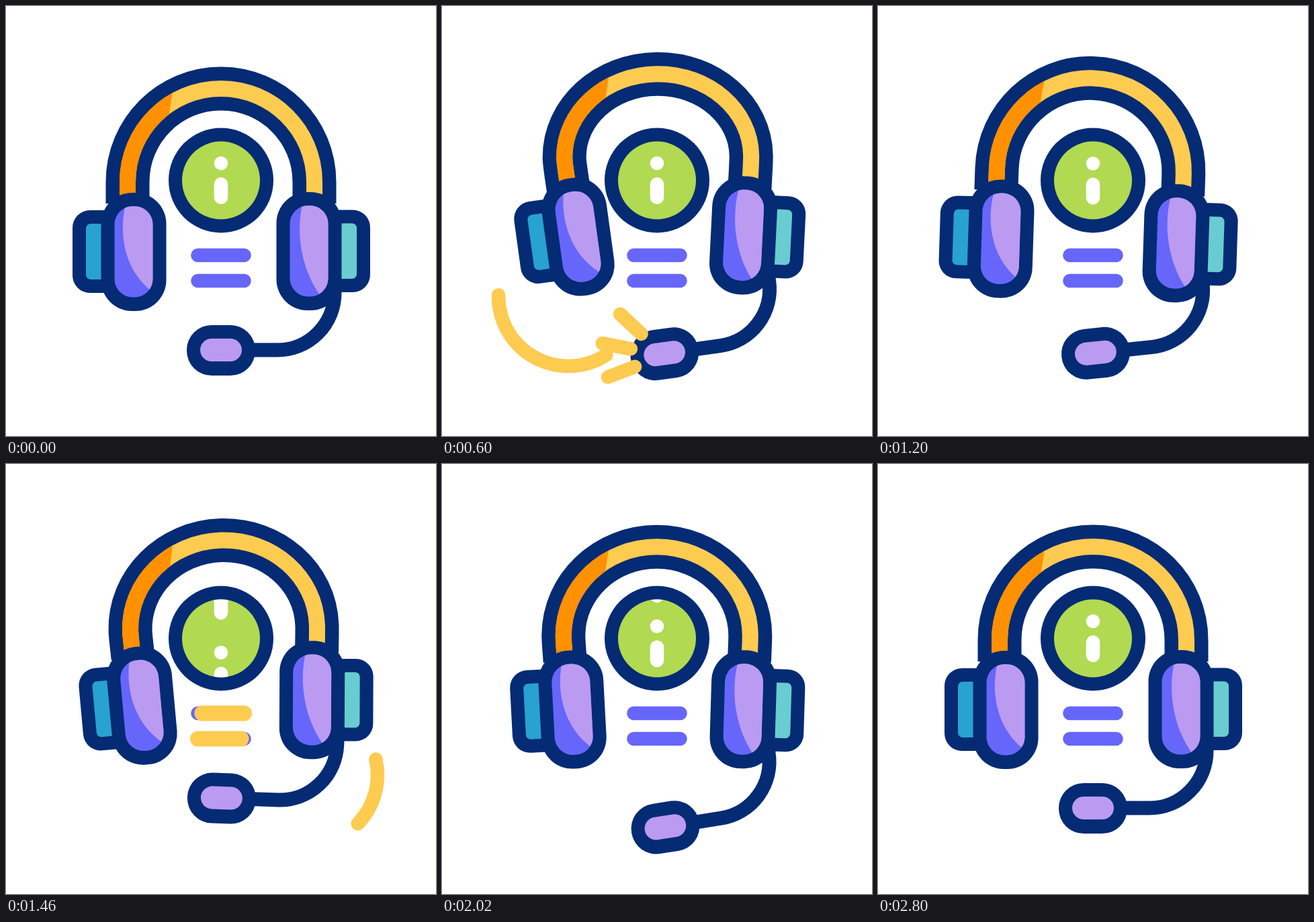
An HTML page with a canvas that plays this animation: 640 px wide and 640 px high, repeating every 3.2 s.

```html
<!DOCTYPE html>
<html lang="en">
<head>
<meta charset="utf-8">
<title>Support headset</title>
<style>
html, body { margin: 0; width: 100%; height: 100%; overflow: hidden; background: #fff; }
canvas { display: block; width: 640px; height: 640px; }
</style>
</head>
<body>
<canvas id="stage" width="640" height="640"></canvas>
<script>
const ctx = document.getElementById('stage').getContext('2d');
const LOOP = 3200;
const RAD = Math.PI / 180;
const NAVY = '#042b74', YELLOW = '#fecb51', ORANGE = '#ff9100', GREEN = '#b1d951';
const PURPLE = '#6766fa', LILAC = '#bb9af1', BLUE = '#28a2d0', TEAL = '#69ccd1';

// Pose tracks as [time, value]
const LIFT = [[260, 0], [440, 11], [610, -22], [960, 11], [1300, -22], [1680, 11], [2060, 0]];
const ROLL = [[260, 0], [380, -1.75], [780, 2.2], [1180, -1.75], [1460, 1.75], [1800, -1.75], [2060, 0]];
const LEFT_EAR = [[260, 0], [600, 7.3], [960, 5.3], [1140, -0.5], [1460, 3.5], [1800, 9.6], [2160, 0]];
const RIGHT_EAR = [[260, 0], [600, 3.4], [960, 3], [1140, 0], [1460, 2], [1800, 5], [2160, 0]];
const MIC_SWING = [[260, 0], [500, 10], [780, 3], [1020, 10.2], [1470, -2], [2200, 10.8], [2800, 0]];

const clamp = v => Math.min(1, Math.max(0, v));
const ease = v => (1 - Math.cos(Math.PI * clamp(v))) / 2;
const span = (t, from, to) => ease((t - from) / (to - from));
const mix = (a, b, k) => a + (b - a) * k;

function track(keys, t) {
  if (t <= keys[0][0]) return keys[0][1];
  for (let i = 1; i < keys.length; i++) {
    const [t0, v0] = keys[i - 1], [t1, v1] = keys[i];
    if (t <= t1) return mix(v0, v1, span(t, t0, t1));
  }
  return keys[keys.length - 1][1];
}

function box(x0, y0, x1, y1, r, color) {
  ctx.beginPath();
  ctx.roundRect(x0, y0, x1 - x0, y1 - y0, r);
  ctx.fillStyle = color;
  ctx.fill();
}

function disc(x, y, r, color) {
  ctx.beginPath();
  ctx.arc(x, y, r, 0, 2 * Math.PI);
  ctx.fillStyle = color;
  ctx.fill();
}

function stroke(color, width, cap = 'round') {
  ctx.strokeStyle = color;
  ctx.lineWidth = width;
  ctx.lineCap = cap;
  ctx.stroke();
}

function line(x0, y0, x1, y1, color, width) {
  ctx.beginPath();
  ctx.moveTo(x0, y0);
  ctx.lineTo(x1, y1);
  stroke(color, width);
}

function turn(x, y, angle) {
  ctx.translate(x, y);
  ctx.rotate(angle);
  ctx.translate(-x, -y);
}

function group(draw) {
  ctx.save();
  draw();
  ctx.restore();
}

function drawMic(swing) {
  turn(489, 437, -swing * RAD);
  ctx.beginPath();
  ctx.moveTo(489, 400);
  ctx.lineTo(489, 427);
  ctx.arc(404, 427, 85, 0, Math.PI / 2);
  ctx.lineTo(350, 512);
  stroke(NAVY, 21, 'butt');
  box(269, 475, 371, 550, 37, NAVY);
  box(289, 495, 351, 529, 17, LILAC);
}

// Half of the headband; side is -1 for left, 1 for right
function bandHalf(side, bend, kneeY) {
  const kneeX = 320 + side * 139;
  const endX = kneeX - side * 45 * Math.sin(bend);
  ctx.moveTo(320, 123);
  ctx.bezierCurveTo(320 + side * 76.8, 123, kneeX, mix(kneeY, 123, 0.5523), kneeX, kneeY);
  ctx.bezierCurveTo(kneeX, kneeY + 10,
    endX + side * 14 * Math.sin(bend), 294 - 14 * Math.cos(bend), endX, 294);
}

function drawBand(left, right) {
  const kneeY = 262 - 85 * Math.max(0, left + right);
  ctx.beginPath();
  bandHalf(-1, left, kneeY);
  bandHalf(1, right, kneeY);
  stroke(NAVY, 65, 'butt');
  stroke(YELLOW, 24, 'butt');
  group(() => {
    ctx.beginPath();
    ctx.moveTo(0, 0);
    ctx.lineTo(267, 0);
    ctx.lineTo(219, 320);
    ctx.lineTo(0, 320);
    ctx.clip();
    ctx.beginPath();
    bandHalf(-1, left, kneeY);
    stroke(ORANGE, 24, 'butt');
  });
}

function drawCup(x0, y0, shine) {
  box(x0, y0, x0 + 97, y0 + 176, 46, NAVY);
  box(x0 + 20, y0 + 20, x0 + 77, y0 + 155.5, 27, PURPLE);
  group(() => {
    ctx.beginPath();
    ctx.roundRect(x0 + 20, y0 + 20, 57, 135.5, 27);
    ctx.clip();
    ctx.beginPath();
    shine();
    ctx.lineTo(x0 + 90, y0 + 160);
    ctx.lineTo(x0 + 90, y0);
    ctx.fillStyle = LILAC;
    ctx.fill();
  });
}

function drawLeftEar(bend) {
  turn(181, 285, -bend);
  box(99, 304, 180, 427, 26, NAVY);
  box(119, 324, 165, 407, 7, BLUE);
  drawCup(141.5, 278, () => {
    ctx.moveTo(178, 296);
    ctx.bezierCurveTo(166, 345, 180, 398, 219, 426);
  });
}

function drawRightEar(bend) {
  turn(459, 285, bend);
  box(460, 303.5, 542, 426, 26, NAVY);
  box(476, 323.5, 522, 406, 7, TEAL);
  drawCup(402.5, 277, () => {
    ctx.moveTo(441, 295);
    ctx.bezierCurveTo(431, 340, 440, 395, 470, 434);
  });
}

function drawInfo(t) {
  const start = 780, period = 440, cycles = 4;
  const phase = (t - start) / period;
  const running = phase >= 0 && phase < cycles;
  const gap = phase < 2 ? 110 : 96;
  const shift = running ? gap * ease(phase % 1) : 0;
  disc(320, 259.5, 78, NAVY);
  disc(320, 259.5, 58, GREEN);
  group(() => {
    ctx.beginPath();
    ctx.arc(320, 259.5, 58, 0, 2 * Math.PI);
    ctx.clip();
    for (const y of running ? [-shift, gap - shift] : [0]) {
      disc(320, 234 + y, 10.3, '#fff');
      line(320, 265.3 + y, 320, 284.7 + y, '#fff', 20.6);
    }
  });
}

function drawTextBar(y, from, to, t, start, end) {
  line(285.5, y, 354.5, y, PURPLE, 20.6);
  if (t < start || t >= end) return;
  const head = span(t, start, start + 300), tail = span(t, start + 300, end);
  line(mix(from, to, tail), y, mix(from, to, head), y, YELLOW, 23);
}

function drawSwoosh(t, start, x, y, from, to) {
  if (t < start || t >= start + 540) return;
  const head = mix(from, to, span(t, start, start + 260)) * RAD;
  const tail = mix(from, to, span(t, start + 260, start + 540)) * RAD;
  ctx.beginPath();
  ctx.arc(x, y, 104, tail, head, to < from);
  stroke(YELLOW, 20.6);
}

function drawSparks(t, start, x, y, middle, length) {
  if (t <= start || t >= start + 280) return;
  for (const offset of [-32, 0, 32]) {
    const base = 51 - Math.abs(offset) / 8;
    const outer = base + length * span(t, start, start + 130);
    const inner = base + length * span(t, start + 140, start + 280);
    const c = Math.cos((middle + offset) * RAD), s = Math.sin((middle + offset) * RAD);
    line(x + inner * c, y + inner * s, x + outer * c, y + outer * s, YELLOW, 20.6);
  }
}

function draw(t) {
  const lift = track(LIFT, t), roll = track(ROLL, t) * RAD;
  const left = track(LEFT_EAR, t) * RAD;
  const rightDeg = track(RIGHT_EAR, t), right = rightDeg * RAD;

  ctx.fillStyle = '#fff';
  ctx.fillRect(0, 0, 640, 640);

  group(() => {
    const sway = Math.sin(roll);
    ctx.translate(157 * sway - 0.7 * rightDeg, lift - 85 * sway + 1.5 * rightDeg);
    drawMic(track(MIC_SWING, t));
  });
  group(() => {
    ctx.translate(0, lift);
    turn(320, 123, -roll);
    drawBand(left, right);
    group(() => drawLeftEar(left));
    group(() => drawRightEar(right));
  });

  drawInfo(t);
  drawTextBar(371, 354.5, 285.5, t, 1220, 1790);
  drawTextBar(409, 285.5, 354.5, t, 1210, 1810);
  drawSwoosh(t, 340, 188, 432, 181, 57);
  drawSwoosh(t, 1340, 449, 463, -13, 115);
  drawSparks(t, 465, 331, 520, 191, 43);
  drawSparks(t, 1665, 288, 523, 205, 38);
}

function frame(now) {
  draw(now % LOOP);
  requestAnimationFrame(frame);
}
draw(0);
requestAnimationFrame(frame);
</script>
</body>
</html>
```
